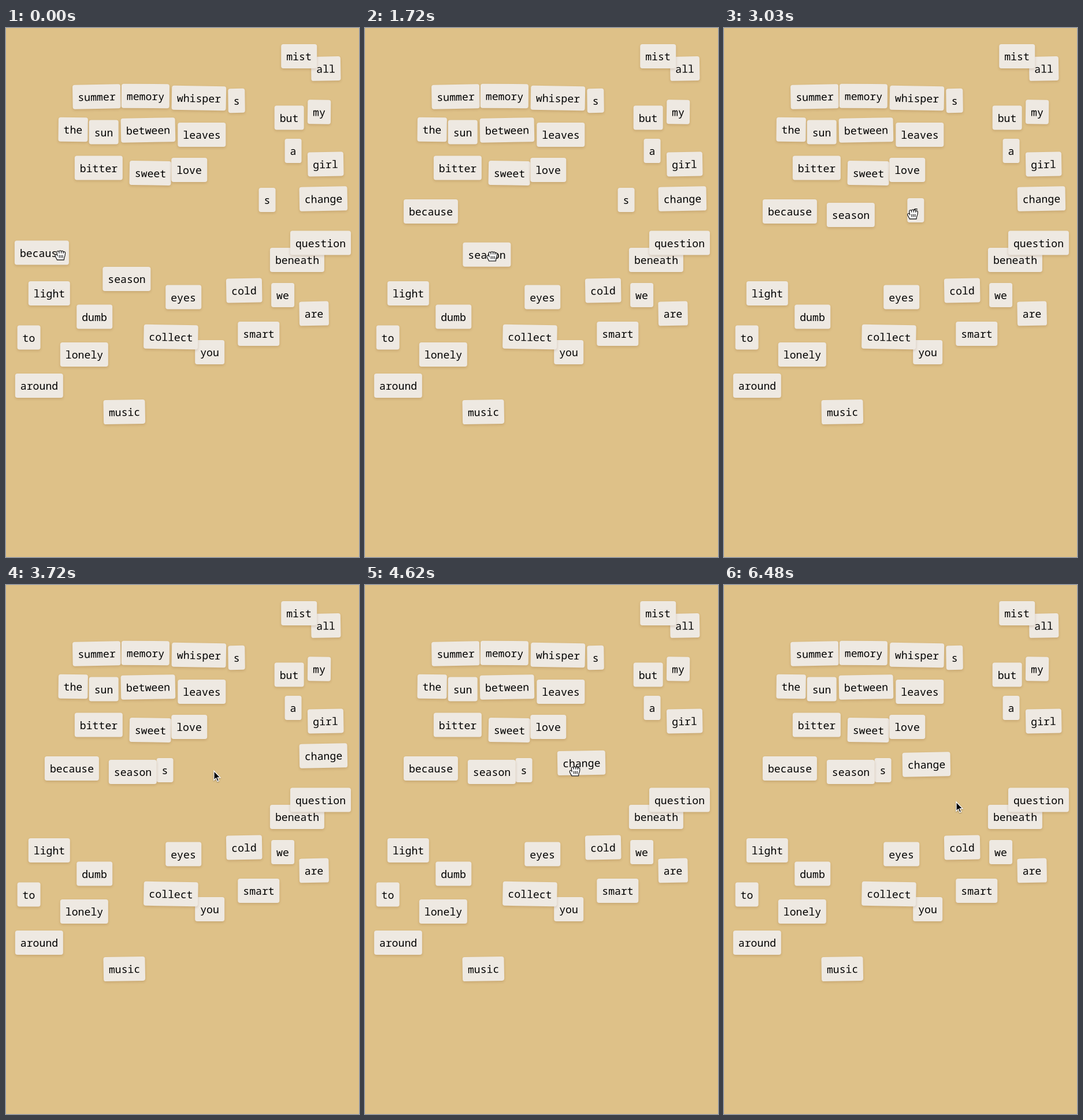
These frames come from a looping animation (611x917 px, 7000 ms). An HTML page:

```html
<!DOCTYPE html>
<html lang="en">
<head>
<meta charset="utf-8">
<title>Word magnets</title>
<style>
  html, body { margin: 0; width: 100%; height: 100%; overflow: hidden; background: #dec188; }
  .tile {
    position: absolute; left: 0; top: 0; height: 42px; padding: 0 9px; border-radius: 4px;
    background: #eee9e2; color: #000; white-space: pre;
    font: 18.15px/42px "Noto Sans Mono", monospace;
    box-shadow: 0 2px 4px rgba(110, 60, 20, .2);
  }
  svg { position: absolute; left: 0; top: 0; overflow: visible; z-index: 100; }
  .hand { fill: #fff; stroke: #222; stroke-width: 1.3; stroke-linejoin: round; stroke-linecap: round; }
  .arrow { fill: #000; stroke: #fff; stroke-width: 1.3; filter: drop-shadow(0 1px 1px rgba(0, 0, 0, .35)); }
</style>
</head>
<body>
<svg id="cursor" width="1" height="1">
  <g id="closed" class="hand">
    <path d="M-5.5 9C-6 6.5-9 4-9 1.5C-9-.8-7-1-5.5 0L-6-4C-6-6.8-3-7-2.2-5.2C-2-7.8 1.2-7.8 1.6-5.4C2.2-7.4 5-7 5.2-4.6C6-6 8.6-5.2 8.6-2.8C8.6 1 7.6 3 6.8 5L6.3 9Z"/>
    <path d="M-1.7 1V5M1.2 1V5M4 1V5M-2.2-5L-2-2.8M1.6-5.2V-2.8M5.2-4.4L5-2.6M-5.5 0L-5 2"/>
  </g>
  <g id="open" class="hand">
    <path d="M-4 8C-5 5-8.5 1.5-8.5-.5C-8.3-2.5-6-2-4.5 .5L-6.5-6C-7-8.5-4.4-9.2-3.6-7L-2.3-3L-2.6-9.5C-2.5-11.8 .1-11.8 .4-9.5L.8-3L2-8.6C2.6-11 5-10.4 4.7-8L4-2L6-5.2C7.4-7 9-5.6 8.2-3.6C7 0 7 3 5.6 5L5 8Z"/>
    <path d="M-1.5 1.5V5M1.2 1.5V5M3.8 1.5V5"/>
  </g>
  <path id="arrow" class="arrow" d="M0 0V16L3.6 12.6L6 18.2L8.6 17.1L6.2 11.6H11Z"/>
</svg>
<script>
const LOOP = 7000;

// word, centre x, centre y, tilt in degrees; later tiles lie on top
const tiles = `all 553.5 70.5 -1, mist 507 49 0, summer 157 119 -1, memory 241.5 118 .4,
  whisper 334 121.5 1, s 399 126 -.8, the 116 176 .7, sun 169 180.5 0, between 246 177 -1,
  leaves 339 185 0, bitter 160.5 242.5 0, sweet 250 251.5 1, love 317 246 0, but 490 155.5 0,
  my 542 145.5 .6, a 497 213 0, girl 553 236 -1, beneath 504 402 0, question 544.5 372.5 0,
  light 75 460 0, eyes 307 466.5 0, cold 412 455 -1, we 479 463 0, are 533 495 -1,
  dumb 153 500.5 0, to 39.5 536.5 0, lonely 135.5 566 0, you 352.5 562 0, collect 285.5 535.5 1,
  smart 437.5 530 0, around 57.5 620 0, music 205 665.5 -1,
  because 62 389.5 0, s 452 298 0, season 209 435 0, change 549.5 296 -1`
  .split(',').map(line => {
    const [word, ...numbers] = line.trim().split(' ');
    const [x, y, tilt] = numbers.map(Number);
    const el = document.createElement('div');
    el.className = 'tile';
    el.textContent = word;
    document.body.append(el);
    return { word, x, y, tilt, el, homeX: x, homeY: y };
  });

const lastOf = word => tiles.filter(tile => tile.word === word).pop();
const drags = [
  { tile: lastOf('because'), from: 0, to: 715 },
  { tile: lastOf('season'), from: 1440, to: 2205 },
  { tile: lastOf('s'), from: 2750, to: 3450 },
  { tile: lastOf('change'), from: 4060, to: 5135 }
];

// Pointer waypoints: time, x, y
const path = [
  [0, 94, 393], [680, 146, 321.5], [920, 146, 321.5], [1400, 218, 437], [1460, 218, 437],
  [1620, 218.5, 416], [1720, 220, 395], [2160, 228.5, 326], [2360, 228.5, 326],
  [2740, 447, 304], [2780, 447, 304], [3030, 327, 322], [3400, 270, 327], [3500, 270, 327],
  [3790, 398, 320], [4040, 538, 309.5], [4080, 538, 309.5], [4280, 461, 309.5],
  [4520, 376.5, 320.5], [4960, 339, 324.5], [5135, 339, 324.5], [5140, 342, 322],
  [5640, 342, 322], [6140, 403, 378], [6440, 403, 378], [6480, 402, 376], [LOOP, 402, 376]
];

const slope = (i, axis) => path[i] && path[i + 1]
  ? (path[i + 1][axis] - path[i][axis]) / (path[i + 1][0] - path[i][0]) : 0;

// Zero at stops and turns, so the pointer never overshoots
function tangent(i, axis) {
  const before = slope(i - 1, axis), after = slope(i, axis);
  return before * after <= 0 ? 0 : 2 * before * after / (before + after);
}

function pointerAt(time) {
  const i = Math.max(0, path.findIndex(point => point[0] > time) - 1);
  const span = path[i + 1][0] - path[i][0];
  const u = (time - path[i][0]) / span, v = 1 - u;
  return [1, 2].map(axis =>
    path[i][axis] * v * v * (1 + 2 * u) + path[i + 1][axis] * u * u * (3 - 2 * u)
    + span * u * v * (v * tangent(i, axis) - u * tangent(i + 1, axis)));
}

const cursor = document.getElementById('cursor');
const shapes = ['closed', 'open', 'arrow'].map(id => document.getElementById(id));

function draw(now) {
  const time = now % LOOP;
  const [px, py] = pointerAt(time);

  for (const { tile, from, to } of drags) {
    const [startX, startY] = pointerAt(from);
    const [x, y] = pointerAt(Math.min(Math.max(time, from), to));
    tile.x = tile.homeX + x - startX;
    tile.y = tile.homeY + y - startY;
  }
  for (const { x, y, tilt, el } of tiles)
    el.style.transform = `translate(${x}px, ${y}px) translate(-50%, -50%) rotate(${tilt}deg)`;

  const dragging = drags.some(({ from, to }) => time >= from && time < to);
  const hovering = tiles.some(({ x, y, el }) =>
    Math.abs(px - x) < el.offsetWidth / 2 && Math.abs(py - y) < 21);
  const kind = dragging ? 'closed' : hovering ? 'open' : 'arrow';
  for (const shape of shapes) shape.style.display = shape.id === kind ? '' : 'none';
  cursor.style.transform = `translate(${px}px, ${py}px)`;
}

const start = performance.now();
function tick() {
  draw(performance.now() - start);
  requestAnimationFrame(tick);
}
tick();
</script>
</body>
</html>
```
